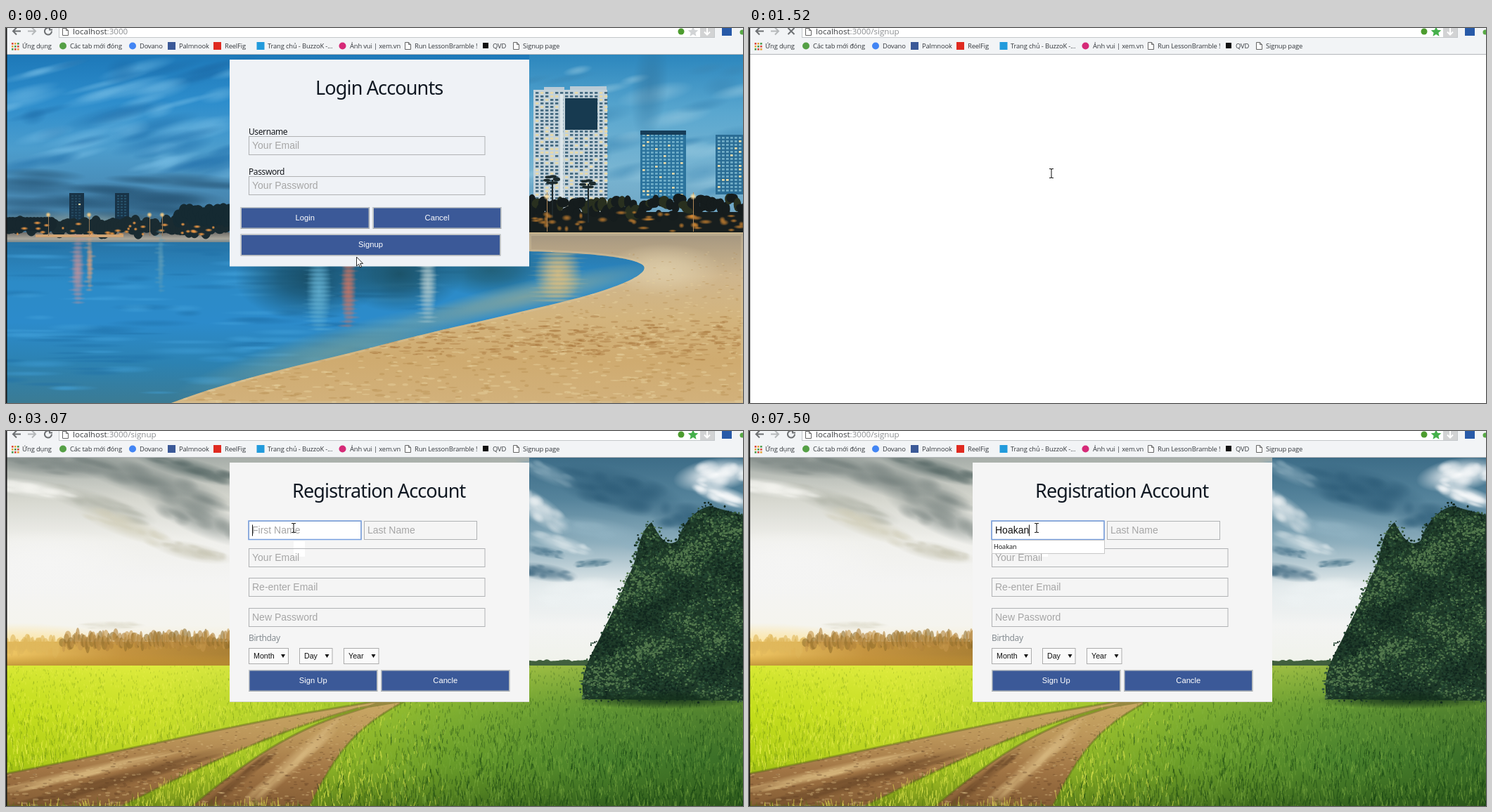
These frames come from a looping animation (1048x534 px, 8000 ms). An HTML page with a canvas:

```html
<!DOCTYPE html>
<html lang="vi">
<head>
<meta charset="utf-8">
<title>Signup demo</title>
<style>
html, body { margin: 0; width: 100%; height: 100%; overflow: hidden; background: #fff; }
canvas, svg { position: absolute; left: 0; top: 0; }
text { white-space: pre; }
.title { font: 27px "Noto Sans", sans-serif; letter-spacing: -.85px; fill: #101822; }
.label { font: 12px "Noto Sans", sans-serif; letter-spacing: -.4px; fill: #15181c; }
.gray { fill: #868d92; }
.field { font: 14px "Liberation Sans", Arial, sans-serif; fill: #a6a6a6; }
.typed { fill: #111; }
.btn { font: 11.2px "Liberation Sans", Arial, sans-serif; fill: #fff; text-anchor: middle; }
.opt { font: 10.67px "Liberation Sans", Arial, sans-serif; fill: #111; }
.mark { font: 9.4px "Open Sans", sans-serif; letter-spacing: -.15px; fill: #33373c; }
.url { font: 11.6px "Open Sans", sans-serif; fill: #8a8d90; }
.hint { font: 9.3px "Noto Sans", sans-serif; letter-spacing: -.2px; fill: #222; }
</style>
</head>
<body>
<canvas id="beach" width="1048" height="534"></canvas>
<canvas id="meadow" width="1048" height="534"></canvas>
<svg id="ui" width="1048" height="534"></svg>
<script>
const $ = id => document.getElementById(id);
const show = (id, on) => $(id).style.display = on ? '' : 'none';
const LOOP = 8000, NAME = 'Hoakan';

// ---------- scenery ----------
let seed = 7;
const rnd = (a = 0, b = 1) => a + (b - a) * ((seed = seed * 16807 % 2147483647) / 2147483647);

function painter(id) {
  const c = $(id).getContext('2d');
  return {
    c,
    rect(color, x, y, w, h) { c.fillStyle = color; c.fillRect(x, y, w, h); },
    shape(color, d) { c.fillStyle = color; c.fill(new Path2D(d)); },
    grad(x, y, w, h, colors, across) {
      const g = across ? c.createLinearGradient(x, 0, x + w, 0) : c.createLinearGradient(0, y, 0, y + h);
      colors.forEach((k, i) => g.addColorStop(i / (colors.length - 1), k));
      c.fillStyle = g;
      c.fillRect(x, y, w, h);
    },
    // soft ellipse fading out to its edge
    soft(color, x, y, rx, ry, tilt = 0, alpha = 1) {
      c.save();
      c.globalAlpha = alpha;
      c.translate(x, y); c.rotate(tilt); c.scale(rx, ry);
      const g = c.createRadialGradient(0, 0, 0, 0, 0, 1);
      g.addColorStop(0, color); g.addColorStop(.4, color + 'bb'); g.addColorStop(1, color + '00');
      c.fillStyle = g;
      c.fillRect(-1, -1, 2, 2);
      c.restore();
    },
    dot(color, x, y, rx, ry = rx) {
      c.fillStyle = color;
      c.beginPath(); c.ellipse(x, y, rx, ry, 0, 0, 7); c.fill();
    },
    // uneven cloud: small puffs scattered around a soft core
    cloud(color, x, y, rx, ry, tilt = 0, alpha = .8) {
      this.soft(color, x, y, rx, ry, tilt, alpha);
      for (let i = 0; i < 14; i++) {
        const u = rnd(-.75, .75) * rx, v = rnd(-.6, .6) * ry;
        this.soft(color, x + u * Math.cos(tilt) - v * Math.sin(tilt), y + u * Math.sin(tilt) + v * Math.cos(tilt),
          rx * rnd(.12, .3), ry * rnd(.2, .45), tilt, alpha * .6);
      }
    }
  };
}

function tower(p, x, y, w, h, wall, glass, dx, dy, lit) {
  p.rect(wall, x, y, w, h);
  for (let j = y + 3; j < y + h - 3; j += dy)
    for (let i = x + 3; i < x + w - 3; i += dx)
      p.rect(rnd() < lit ? '#e6d9a8' : glass, i, j, dx * .62, dy * .55);
}

function drawBeach() {
  const p = painter('beach'), c = p.c;
  p.grad(0, 37, 1048, 270, ['#1d78b8', '#2d8dcc', '#4c9dcd', '#4888b2', '#416f8d']);
  p.grad(744, 37, 304, 250, ['#2b86bd', '#5aa7cf', '#79b5d2', '#6ba0bf']);
  for (let i = 0; i < 60; i++)
    p.soft(rnd() < .55 ? '#79bfe6' : '#1c6ba8', rnd(0, 330), rnd(50, 205), rnd(20, 70), rnd(5, 14), -.25, .45);
  for (let i = 0; i < 36; i++)
    p.soft(rnd() < .6 ? '#9bcbe0' : '#3a86b4', rnd(744, 1048), rnd(50, 240), rnd(20, 60), rnd(6, 17), -.2, .5);
  for (let i = 0; i < 22; i++)
    p.soft('#285778', rnd(0, 330), rnd(205, 275), rnd(40, 90), rnd(6, 15), .05, .6);
  p.soft('#2e6f98', 915, 85, 26, 75, .1, .5);
  p.soft('#a4a48e', 100, 276, 150, 16, 0, .5);

  tower(p, 90, 235, 21, 40, '#183347', '#23475e', 5, 4, .03);
  tower(p, 155, 235, 20, 38, '#183347', '#265069', 5, 4, .03);
  tower(p, 750, 88, 105, 175, '#c4d3db', '#456a80', 7, 5, .22);
  p.shape('#b9cbd6', 'M765 88V84H794V88ZM802 88V83H854V88Z');
  p.rect('#173a50', 795, 100, 46, 45);
  p.rect('#dce6ea', 788, 94, 4, 165);
  tower(p, 902, 148, 65, 95, '#2b739d', '#6faec9', 6, 5, .12);
  p.rect('#163d59', 902, 146, 65, 6);
  tower(p, 1009, 152, 39, 85, '#2a6c94', '#71adc7', 6, 5, .12);

  // far shore and palms
  p.grad(0, 291, 1048, 18, ['#6e6c68', '#a9a69b', '#526f80']);
  for (let x = 0; x < 320; x += 4) p.dot('#1a2b31', x, 283 + rnd(-5, 5), 8, rnd(6, 14));
  for (let x = 0; x < 70; x += 5) p.dot('#17272e', x, 279, 7, 10);
  for (let x = 245; x < 320; x += 4) p.dot('#152a32', x, 266 + rnd(-8, 8), 8, rnd(7, 14));
  for (let i = 0; i < 34; i++) p.soft('#f29b45', rnd(5, 315), rnd(276, 296), rnd(2, 6), 2.5);
  p.rect('#d0a474', 42, 294, 125, 4);
  for (const x of [60, 118, 204, 222]) { p.rect('#967a58', x, 266, 1, 30); p.soft('#ffd184', x, 266, 4, 4); }

  // water
  p.grad(0, 305, 1048, 229, ['#2774a6', '#2c8bc7', '#2c8bcb', '#2c82b2', '#3b7b94']);
  for (let i = 0; i < 150; i++)
    p.soft(rnd() < .5 ? '#43a3dc' : '#1d6ea6', rnd(0, 640), rnd(308, 520), rnd(20, 70), rnd(2, 6), 0, .45);
  p.soft('#184c64', 430, 355, 105, 62, 0, .95);
  p.soft('#1a4d60', 560, 350, 90, 55, 0, .9);
  p.soft('#205b70', 690, 345, 85, 38, 0, .85);
  p.soft('#6e9c9e', 470, 460, 240, 34, -.27, .8);
  p.soft('#8aa69a', 740, 382, 200, 22, -.22, .8);
  const glints = [[102, 345, 9, 50, '#cc9297'], [119, 335, 5, 40, '#e0a17c'], [487, 370, 11, 60, '#d67560'],
    [445, 375, 18, 60, '#68b6d7'], [600, 365, 13, 55, '#b9cfd1'], [785, 350, 34, 40, '#f3c577'], [220, 335, 5, 45, '#5d9cb8']];
  for (const [x, y, rx, ry, k] of glints) {
    p.soft(k, x, y, rx, ry, 0, .75);
    for (let j = -ry; j < ry; j += 6) p.soft(k, x + rnd(-5, 5), y + j, rx * 1.2, 2.5, 0, .4);
  }

  // sand
  const sand = new Path2D('M235 534C330 498 430 478 520 455C630 426 730 406 815 384C885 365 918 347 905 337C885 324 810 320 744 318V293H1048V534Z');
  c.save();
  c.clip(sand);
  p.grad(0, 293, 1048, 241, ['#a59780', '#cfb68d', '#d3b47d', '#cfab70', '#d2b17b']);
  p.soft('#e1d1ad', 935, 345, 85, 38, 0, .8);
  for (let i = 0; i < 1500; i++) {
    const y = rnd(318, 534), k = (y - 290) / 240;
    p.dot(rnd() < .5 ? '#b1884855' : '#e6cf9d77', rnd(235, 1048), y, rnd(2, 7) * k + 1, rnd(.5, 1.6) * k + .4);
  }
  for (let i = 0; i < 380; i++)
    p.dot('#9b682f55', rnd(500, 1048), 442 + rnd(-24, 24) + rnd(-10, 10), rnd(2, 9), rnd(.7, 1.8));
  c.lineWidth = 6;
  c.strokeStyle = '#d8c9a455';
  c.stroke(sand);
  c.restore();

  // right grove
  p.rect('#171e1e', 744, 262, 304, 30);
  for (let x = 744; x < 1060; x += 4)
    p.dot(rnd() < .7 ? '#151c1d' : '#29301f', x, rnd(246, 268) - (x > 950 ? 7 : 0), rnd(5, 9), rnd(5, 11));
  for (const [x, y] of [[776, 216], [827, 222]]) {
    p.rect('#1d272a', x, y, 2, 55);
    for (let a = 0; a < 7; a++) p.dot('#1d2b2d', x + 7 * Math.cos(a), y + 5 * Math.sin(a), 5, 2);
  }
  for (let i = 0; i < 45; i++) p.soft('#da8b31', rnd(744, 1048), rnd(262, 289), rnd(3, 10), rnd(2, 5), 0, .75);
  for (const x of [769, 977]) { p.rect('#b08655', x, 234, 1, 56); p.soft('#ffe0a0', x, 240, 5, 5); }
  p.rect('#cab68e', 744, 291, 304, 2);
}

function drawMeadow() {
  const p = painter('meadow'), c = p.c;
  p.grad(0, 37, 744, 300, ['#a6ada8', '#d6d7cf', '#f0f0ec', '#f4f4f3', '#f5f4ee', '#f8e6b4']);
  p.grad(744, 37, 304, 300, ['#3c6c87', '#55839b', '#8bacbb', '#dfe7e9', '#f3f4f3', '#f0f2ea']);
  p.cloud('#7d8784', 60, 48, 110, 18, .1);
  p.cloud('#76817e', 205, 72, 130, 24, .3);
  p.cloud('#8a938f', 270, 120, 90, 26, .45);
  p.cloud('#566765', 265, 55, 85, 15, .25);
  p.cloud('#b3b6ab', 130, 104, 90, 17, .3);
  p.cloud('#f4f4ef', 35, 82, 80, 13, .15, .9);
  p.cloud('#d2cfbb', 170, 135, 75, 17, .35);
  p.cloud('#cac8b7', 265, 172, 60, 14, .2);
  p.soft('#f5f5f4', 60, 190, 140, 50);
  p.cloud('#dedbcb', 150, 277, 50, 7, 0, .6);

  p.cloud('#7fa3b5', 770, 60, 50, 14, .4);
  p.cloud('#2c5b77', 870, 85, 100, 32, .25);
  p.cloud('#e9eff1', 755, 110, 60, 20, .6);
  p.cloud('#8fb1c1', 850, 145, 80, 20, .2);
  p.cloud('#d3e0e5', 790, 160, 50, 12, .3);
  p.cloud('#eef3f4', 830, 235, 120, 28);
  p.cloud('#426b83', 765, 201, 50, 13, .15);
  p.cloud('#537d91', 835, 188, 30, 7, -.1);
  p.cloud('#557e94', 765, 172, 32, 8, .2);
  p.cloud('#34637e', 985, 125, 70, 24, .1);
  p.cloud('#f7f9fa', 1010, 62, 62, 24, -.15, 1);
  p.cloud('#f7f9fa', 1020, 92, 50, 14, .3, 1);
  p.soft('#ffe08a', 15, 318, 170, 45, 0, .9);

  // far trees
  p.grad(0, 300, 330, 36, ['#efc764', '#c5943f', '#a97f34'], true);
  for (let x = 0; x < 325; x += 2) {
    const y = 306 - (x > 85 ? 8 : 0) + rnd(-7, 7);
    p.dot(x < 80 ? '#e0b75c99' : ['#b0823a99', '#c4964b99', '#936f2d99'][x % 3], x, y, rnd(2, 5), rnd(5, 12));
  }
  p.grad(0, 318, 330, 17, ['#c9963300', '#b58a2ecc']);
  for (let x = 744; x < 830; x += 5) p.dot('#41603e', x, 331, 6, rnd(3, 6));

  // field
  p.grad(0, 334, 1048, 200, ['#c3de14', '#cfe326', '#a9cb2a', '#6ea42e', '#448030', '#2f652a'], true);
  p.grad(0, 334, 1048, 200, ['#f0f45a77', '#c4dc3a33', '#5d861a33', '#24460c88']);

  // ruts with a shaded lower side
  const ruts = new Path2D('M0 488C120 465 330 418 430 401L520 386H555L500 395C400 422 290 470 165 534H0ZM265 534C330 480 390 435 470 407L535 386H565C500 420 470 455 432 534Z');
  c.save();
  c.clip(ruts);
  p.grad(0, 386, 560, 148, ['#c9a864', '#bc965a', '#a07444', '#855d35']);
  p.cloud('#6b4828', 150, 500, 190, 12, -.28, .7);
  p.cloud('#dcbd82', 110, 487, 160, 9, -.22, .7);
  p.cloud('#6b4828', 310, 515, 110, 9, -.7, .7);
  p.cloud('#d8b980', 405, 475, 110, 13, -.75, .7);
  for (let i = 0; i < 1400; i++) {
    const y = rnd(386, 534), k = (y - 380) / 150;
    p.dot(rnd() < .5 ? '#5d3d2255' : '#e2c58d55', rnd(0, 560), y, rnd(1, 4) * k + 1, rnd(.5, 1.4) * k + .3);
  }
  c.restore();
  c.lineWidth = 3;
  c.strokeStyle = '#5f681b77';
  c.stroke(ruts);

  for (let i = 0; i < 9000; i++) {
    const x = rnd(0, 1048), y = rnd(336, 544), k = (y - 325) / 200;
    if (c.isPointInPath(ruts, x, y)) continue;
    const right = x + rnd(-120, 120) > 520;
    c.strokeStyle = rnd() < .5 ? (right ? '#0d380f66' : '#52790f55') : right ? '#8cbb4a55' : '#f4f65a77';
    c.lineWidth = .6 + k * .6;
    c.beginPath();
    c.moveTo(x, y);
    c.lineTo(x + rnd(-3, 3) * k, y - 2 - rnd(3, 12) * k);
    c.stroke();
  }

  // big trees: leaves scattered beyond a dark core, lit from the left
  const crown = new Path2D('M822 382C812 345 838 310 848 287C862 258 874 236 882 212C892 196 896 180 900 162C904 145 912 134 918 130C928 148 938 168 955 156C965 126 985 110 1000 107C1020 112 1035 116 1048 120V384Z');
  c.fillStyle = '#1d3827';
  c.fill(crown);
  for (let i = 0; i < 9000; i++) {
    const x = rnd(800, 1048), y = rnd(100, 385);
    if (!c.isPointInPath(crown, x, y)) continue;
    const shade = Math.sin(x / 17 + Math.sin(y / 13) * 2) + Math.sin(y / 19 + x / 41) + rnd(-1.5, 1.5);
    p.dot(shade > 1.1 ? '#53784d' : shade > 0 ? '#355a3a' : shade > -1.1 ? '#234431' : '#12281f',
      x + rnd(-7, 7), y + rnd(-6, 4), rnd(.7, 2.2), rnd(.7, 1.8));
  }
  p.soft('#14301b', 935, 383, 130, 13, 0, .85);
}

// ---------- interface ----------
const rect = (x, y, w, h, fill, more = '') => `<rect x="${x}" y="${y}" width="${w}" height="${h}" fill="${fill}" ${more}/>`;
const text = (x, y, cls, s, more = '') => `<text x="${x}" y="${y}" class="${cls}" ${more}>${s}</text>`;
const line = (d, color, w = 1, more = '') => `<path d="${d}" fill="none" stroke="${color}" stroke-width="${w}" ${more}/>`;
const disc = (x, y, r, fill) => `<circle cx="${x}" cy="${y}" r="${r}" fill="${fill}"/>`;
const input = (x, y, w, s, id = '') =>
  rect(x + .5, y + .5, w - 1, 26, 'none', 'stroke="#b0b2b4"') + text(x + 5, y + 18, 'field', s, id);
const button = (x, y, w, s) =>
  rect(x, y, w, 31, '#a3a8ab') + rect(x, y, w - 1, 30, '#c3c7c8') +
  rect(x + 1.5, y + 1.5, w - 3, 28, '#3b5998') + text(x + w / 2, y + 18.7, 'btn', s);
const select = (x, w, s) =>
  rect(x + .5, 309.5, w - 1, 22, '#fafafa', 'stroke="#acacac"') + text(x + 7, 324, 'opt', s) +
  `<path d="M${x + w - 11} 318h6l-3 5z" fill="#111"/>`;
const page = (x, y) => `<path d="M${x} ${y}h5l3 3v7h-8zM${x + 5} ${y}v3h3" fill="#fff" stroke="#666"/>`;

function toolbar() {
  const square = (x, color) => rect(x, 20, 11, 11, color);
  const dots = ['#d9473a', '#e8a33a', '#4a9a4a'];
  let apps = '';
  for (let i = 0; i < 9; i++) apps += rect(8 + i % 3 * 4, 21 + (i / 3 | 0) * 4, 2.6, 2.6, dots[(i + (i / 3 | 0)) % 3]);
  const marks = [[23, 'Ứng dụng', apps], [91, 'Các tab mới đóng', disc(81, 25.5, 5, '#55a046')],
    [190, 'Dovano', disc(180, 25.5, 5, '#4285f4')], [246, 'Palmnook', square(230, '#3b5998')],
    [311, 'ReelFig', square(295, '#e02a20')], [372, 'Trang chủ - BuzzoK -...', square(356.5, '#229bdc')],
    [489, 'Ảnh vui | xem.vn', disc(478.5, 25.5, 5, '#d62a78')], [581, 'Run LessonBramble !', page(567.5, 20.5)],
    [692, 'QVD', rect(678, 21, 8, 8, '#111')], [735, 'Signup page', page(721.5, 20.5)]];
  return rect(0, 0, 1048, 37, '#f2f4f6') + rect(75.5, -5, 932, 18.5, '#fff', 'stroke="#c3c7ca"') +
    line('M1 37.5H1048', '#b3b7ba') +
    line('M21 4.5H10M15 -.5L10 4.5L15 9.5', '#6d7073', 2) + line('M31 4.5H42M37 -.5L42 4.5L37 9.5', '#b5b8ba', 2) +
    line('M65 4.5A5 5 0 1 1 62 0M62 -2V2.5H66', '#6d7073', 2, 'id="reload"') +
    line('M55.5 0L64.5 9M64.5 0L55.5 9', '#6d7073', 2, 'id="stop"') +
    page(80.5, .5) +
    `<text x="95" y="9" class="url"><tspan fill="#3d4043">localhost</tspan>:3000<tspan id="path">/signup</tspan></text>` +
    disc(960, 5, 4.5, '#4c9c2e') +
    '<path id="star" d="M977 -2l2.1 4.7 5.2.5-3.9 3.5 1.1 5.1-4.5-2.7-4.5 2.7 1.1-5.1-3.9-3.5 5.2-.5z"/>' +
    rect(987, 0, 20, 13, '#d2d3d4') + line('M997 0V9M993 5.5L997 9.5L1001 5.5', '#fff', 2) +
    rect(1018, -1, 14, 12, '#285aa8') + disc(1047, 6, 3.5, '#58a946') +
    marks.map(([x, s, icon]) => icon + text(x, 28.8, 'mark', s)).join('');
}

$('ui').innerHTML = `
<g id="login">
  ${rect(318, 45, 426, 294.5, '#eff2f6')}
  <g id="trail">${rect(437, 217, 18, 20, '#fff')}${rect(435, 240, 28, 13, '#e9e9f1')}${rect(494, 326, 13, 13, '#e9e9f1')}</g>
  ${text(440, 95, 'title', 'Login Accounts')}
  ${text(345, 152, 'label', 'Username')}${input(345, 154, 336.5, 'Your Email')}
  ${text(345, 209, 'label', 'Password')}${input(345, 211, 336.5, 'Your Password')}
  ${button(333.5, 255, 183.5, 'Login')}${button(521.5, 255, 183, 'Cancel')}${button(333.5, 293.5, 370, 'Signup')}
  ${rect(333.5, 293.5, 370, 30.5, 'none', 'id="ring" stroke="#8eb1e6" stroke-width="2"')}
</g>
<g id="register">
  ${rect(318, 45, 426, 341, '#f5f5f5')}
  ${line('M318 385.5H744', '#d8d8d2')}
  ${text(407, 95, 'title', 'Registration Account')}
  ${rect(409, 157, 16, 22, '#fff', 'id="patch"')}
  <g id="focus">${rect(345, 128, 160, 27, '#fff')}</g>
  ${input(345, 128, 160.5, 'First Name', 'id="first"')}${input(509, 128, 161, 'Last Name')}
  ${rect(345, 128, 160, 26.5, 'none', 'id="glow" stroke="#759edf" stroke-width="1.5"')}
  ${input(345, 167, 336.5, 'Your Email')}${input(345, 209, 336.5, 'Re-enter Email')}${input(345, 252, 336.5, 'New Password')}
  ${text(345, 299, 'label gray', 'Birthday')}
  ${select(345, 57, 'Month')}${select(417, 47.5, 'Day')}${select(480, 50.5, 'Year')}
  ${button(345, 340, 183.5, 'Sign Up')}${button(533, 340, 183.5, 'Cancle')}
  <g id="drop">${rect(345.5, 155.5, 160, 19, '#fff', 'stroke="#c8c8c8"')}${text(348, 168, 'hint', NAME)}</g>
  ${rect(350, 133.5, 1, 16, '#111', 'id="caret"')}
</g>
${toolbar()}
${rect(0, 0, 1.5, 534, '#151515')}
<g id="cursor">
  <path id="arrow" d="M.5 0V13L3.5 10.2L5.6 15L7.7 14L5.6 9.4H9.6Z" fill="#fff" stroke="#111" stroke-width=".9"/>
  ${line('M-3 -6.5H-1L0 -5.5L1 -6.5H3M0 -5.5V5.5M-3 6.5H-1L0 5.5L1 6.5H3', '#222', 1.1, 'id="beam"')}
  <path id="hand" d="M-1.5 9V.8a1.3 1.3 0 0 1 2.6 0V5.5l5.5 1.2q1.4.5 1.3 2L6.8 13v3H-.5V14L-4.5 8.8q-.3-1.6 1.2-1.4Z" fill="#fff" stroke="#111" stroke-width=".9"/>
</g>`;

// ---------- timeline ----------
const BLANK = 1520, OPEN = 1600, FOCUS = 2020, DROP = 6740;
const keys = [6720, 6920, 7100, 7270, 7390, 7500];
const route = [[40, 498, 326], [490, 493, 311], [1250, 493, 311], [1490, 438, 224], [1520, 430, 207], [1680, 417, 164], [1850, 409, 138]];

function pointer(t) {
  const i = route.findIndex(k => k[0] > t);
  if (i < 0) return route[route.length - 1].slice(1);
  if (!i) return route[0].slice(1);
  const [t0, x0, y0] = route[i - 1], [t1, x1, y1] = route[i], k = (t - t0) / (t1 - t0);
  return [Math.round(x0 + (x1 - x0) * k), Math.round(y0 + (y1 - y0) * k)];
}

function pointerKind(t, y) {
  const over = (a, b) => y >= a && y <= b;
  if (t < BLANK) return over(294, 324) || over(255, 285) ? 'hand' : over(212, 238) ? 'beam' : 'arrow';
  if (t < OPEN) return 'beam';
  return over(128, 155) || over(167, 194) ? 'beam' : 'arrow';
}

function render(t) {
  const login = t < BLANK, open = t >= OPEN, focus = t >= FOCUS, loading = t >= 1100 && !open;
  const typed = keys.filter(k => t >= k).length;
  $('beach').style.visibility = login ? 'visible' : 'hidden';
  $('meadow').style.visibility = open ? 'visible' : 'hidden';
  show('login', login);
  show('register', open);
  show('ring', t >= 950);
  show('trail', t >= 1480);
  show('reload', !loading);
  show('stop', loading);
  show('path', t >= 1100);
  $('star').setAttribute('fill', t >= 1250 ? '#45b04b' : '#d2d4d6');
  show('patch', t >= 1720);
  show('focus', focus);
  show('glow', focus);
  show('drop', t >= DROP);

  const first = $('first');
  first.textContent = typed ? NAME.slice(0, typed) : 'First Name';
  first.setAttribute('class', typed ? 'field typed' : 'field');
  show('caret', focus && (typed || Math.floor((t - FOCUS) / 524) % 2 === 0));
  $('caret').setAttribute('x', 350 + (typed ? Math.round(first.getComputedTextLength()) : 0));

  const [x, y] = pointer(t), kind = pointerKind(t, y);
  for (const id of ['arrow', 'beam', 'hand']) show(id, id === kind);
  $('cursor').setAttribute('transform', `translate(${x} ${y})`);
}

drawBeach();
drawMeadow();
const start = performance.now();
function tick() {
  render((performance.now() - start) % LOOP);
  requestAnimationFrame(tick);
}
tick();
</script>
</body>
</html>
```
